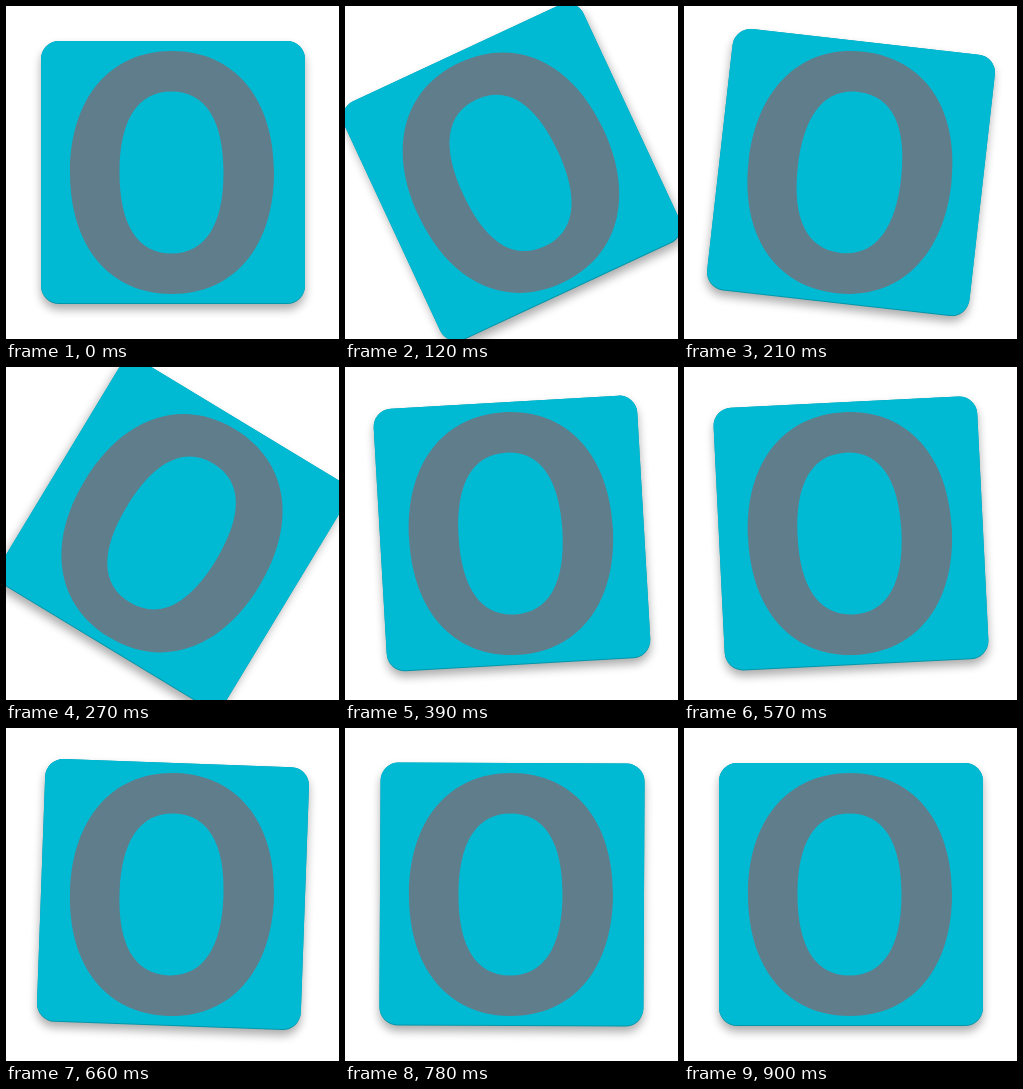
An HTML page with a canvas for the animation above (930 ms loop, 333x333 px).

```html
<!DOCTYPE html>
<html>
<head>
<meta charset="utf-8">
<style>
  html, body { margin: 0; width: 100%; height: 100%; overflow: hidden; background: #fff; }
  canvas { display: block; width: 333px; height: 333px; }
</style>
</head>
<body>
<canvas id="stage" width="333" height="333"></canvas>
<script>
const ctx = document.getElementById('stage').getContext('2d');
const LOOP = 930, STEP = 30, CENTER = 166.5;

// Damped swing in degrees, at rest on the first and last step.
function swing(t) {
  if (t < STEP || t >= 900) return 0;
  const amplitude = 189 * Math.exp(-0.0061 * t);
  return -amplitude * Math.sin(Math.PI * (395.7 - t) / 94.7);
}

function roundOval(cx, cy, rx, ry, k) {
  const kx = rx * k, ky = ry * k;
  ctx.moveTo(cx, cy - ry);
  ctx.bezierCurveTo(cx + kx, cy - ry, cx + rx, cy - ky, cx + rx, cy);
  ctx.bezierCurveTo(cx + rx, cy + ky, cx + kx, cy + ry, cx, cy + ry);
  ctx.bezierCurveTo(cx - kx, cy + ry, cx - rx, cy + ky, cx - rx, cy);
  ctx.bezierCurveTo(cx - rx, cy - ky, cx - kx, cy - ry, cx, cy - ry);
  ctx.closePath();
}

function tile(y, height, color) {
  ctx.fillStyle = color;
  ctx.beginPath();
  ctx.roundRect(-131.5, y, 264, height, 18);
  ctx.fill();
}

// Canvas shadows ignore rotation, so the offset is turned by hand.
function setShadow(angle, distance, blur, alpha) {
  ctx.shadowColor = `rgba(0,0,0,${alpha})`;
  ctx.shadowBlur = blur;
  ctx.shadowOffsetX = -Math.sin(angle) * distance;
  ctx.shadowOffsetY = Math.cos(angle) * distance;
}

function draw(t) {
  const angle = swing(t) * Math.PI / 180;
  ctx.setTransform(1, 0, 0, 1, 0, 0);
  ctx.fillStyle = '#fff';
  ctx.fillRect(0, 0, 333, 333);
  ctx.translate(CENTER, CENTER);
  ctx.rotate(angle);

  setShadow(angle, 5.5, 10, 0.33);
  tile(-131.5, 263, '#0097aa');
  ctx.shadowColor = 'transparent';
  tile(-131.5, 262, '#00bad4');

  ctx.fillStyle = '#607d8b';
  ctx.beginPath();
  roundOval(-0.5, 0, 102, 121.5, 0.61);
  roundOval(-1, 0, 52, 81, 0.65);
  ctx.fill('evenodd');
}

function tick() {
  const t = performance.now() % LOOP;
  draw(Math.floor(t / STEP) * STEP);
  requestAnimationFrame(tick);
}
tick();
</script>
</body>
</html>
```
